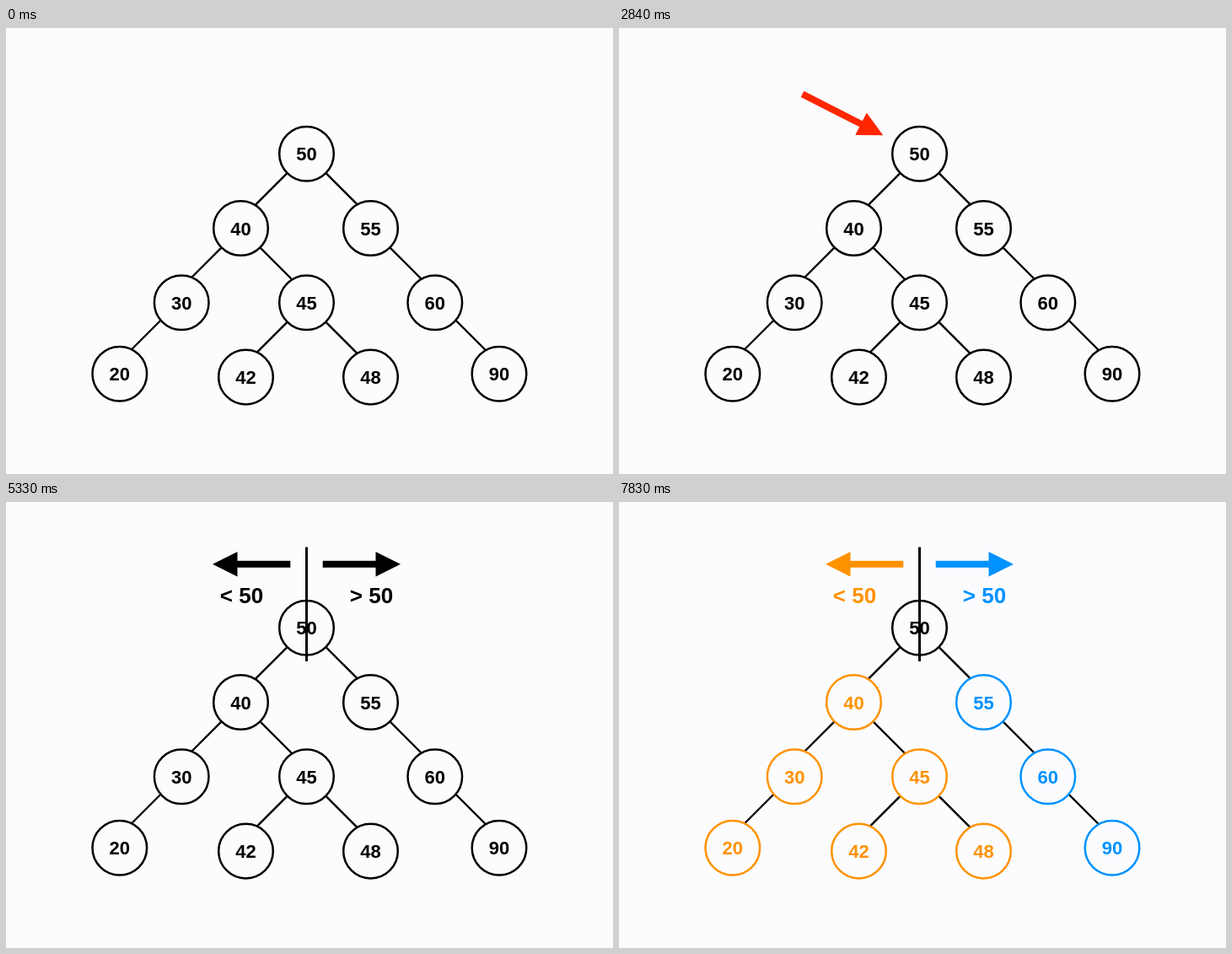
An HTML page for the animation above (8 s loop, 720x529 px).

```html
<!DOCTYPE html>
<html lang="en">
<head>
<meta charset="utf-8">
<title>Binary search tree</title>
<style>
  html, body { margin: 0; width: 100%; height: 100%; overflow: hidden; background: #fcfcff; }
  svg { display: block; width: 100vw; height: 100vh; color: #000; }
  text { font: bold 22px "Liberation Sans", Arial, sans-serif; text-anchor: middle; fill: currentColor; }
  circle { fill: #fcfcff; stroke: currentColor; stroke-width: 2.5; }
  line { stroke: #000; stroke-width: 2.4; }
  path { fill: currentColor; }
  .label { font-size: 26px; }
  .divider { stroke-width: 3; }
  .pointer { color: #ff2600; }
  .pointer, .split { visibility: hidden; }
  .show-pointer .pointer, .show-split .split, .show-colors .split { visibility: visible; }
  .show-colors .less { color: #ff9200; }
  .show-colors .more { color: #0092ff; }
</style>
</head>
<body>
<svg id="stage" viewBox="0 0 720 529"></svg>
<script>
const LOOP = 8000;
const STEPS = [[0, ""], [1150, "show-pointer"], [3490, "show-split"], [6330, "show-colors"]];

const ROOT = { value: 50, x: 356.5, y: 149.2, side: "root" };
const ROW = 88.3;
const RADIUS = 32.3;
const EDGE = 63;
const LIFT = 3.8;
// value and column of each node, in order of insertion
const INSERTED = [
  [40, 278.5], [55, 432.5], [30, 208.2], [45, 356.5], [60, 508.8],
  [20, 134.8], [42, 284.5], [48, 432.5], [90, 585]
];
const stage = document.getElementById("stage");

function add(parent, tag, attributes, text = "") {
  const element = document.createElementNS(stage.namespaceURI, tag);
  for (const name in attributes) element.setAttribute(name, attributes[name]);
  element.textContent = text;
  return parent.appendChild(element);
}

const group = (parent, name) => add(parent, "g", { class: name });

function drawNode(parent, { value, x, y, side }) {
  const node = group(parent, side);
  add(node, "circle", { cx: x, cy: y, r: RADIUS });
  add(node, "text", { x, y: y + 8 }, value);
}

// Edges leave the parent at 45 degrees and end beneath the child.
function drawEdge(parent, from, toward, lift) {
  const y = from.y - lift;
  add(parent, "line", { x1: from.x, y1: y, x2: from.x + toward * EDGE, y2: y + EDGE });
}

function drawTree() {
  const edges = group(stage, "edges");
  const nodes = group(stage, "nodes");
  const values = INSERTED.map(([value]) => value);
  const outermost = [Math.min(...values), Math.max(...values)];
  drawNode(nodes, ROOT);

  for (const [value, x] of INSERTED) {
    let parent = ROOT;
    let branch = value < ROOT.value ? "left" : "right";
    while (parent[branch]) {
      parent = parent[branch];
      branch = value < parent.value ? "left" : "right";
    }
    const lift = outermost.includes(value) ? LIFT : 0;
    const side = value < ROOT.value ? "less" : "more";
    const node = { value, x, y: parent.y + ROW - lift, side };
    parent[branch] = node;
    drawEdge(edges, parent, branch === "left" ? -1 : 1, lift);
    drawNode(nodes, node);
  }
}

// The tip lies at x, y; the shaft trails behind it.
function drawArrow(parent, x, y, angle, length) {
  add(parent, "path", {
    d: `M0 0L-29.5 -14.8V-4H${-length}V4H-29.5V14.8Z`,
    transform: `translate(${x} ${y}) rotate(${angle})`
  });
}

function drawHalf(parent, side, direction, sign) {
  const half = group(parent, side);
  drawArrow(half, ROOT.x + direction * 111.5, 73.7, direction < 0 ? 180 : 0, 92.3);
  add(half, "text", { class: "label", x: ROOT.x + direction * 77, y: 120 }, `${sign} ${ROOT.value}`);
}

drawTree();
drawArrow(group(stage, "pointer"), 313.3, 127.2, 27, 107.5);
const split = group(stage, "split");
add(split, "line", { class: "divider", x1: ROOT.x, y1: 53.5, x2: ROOT.x, y2: 189 });
drawHalf(split, "less", -1, "<");
drawHalf(split, "more", 1, ">");

function draw() {
  const time = performance.now() % LOOP;
  const state = STEPS.filter(([start]) => start <= time).pop()[1];
  stage.setAttribute("class", state);
  requestAnimationFrame(draw);
}
draw();
</script>
</body>
</html>
```
